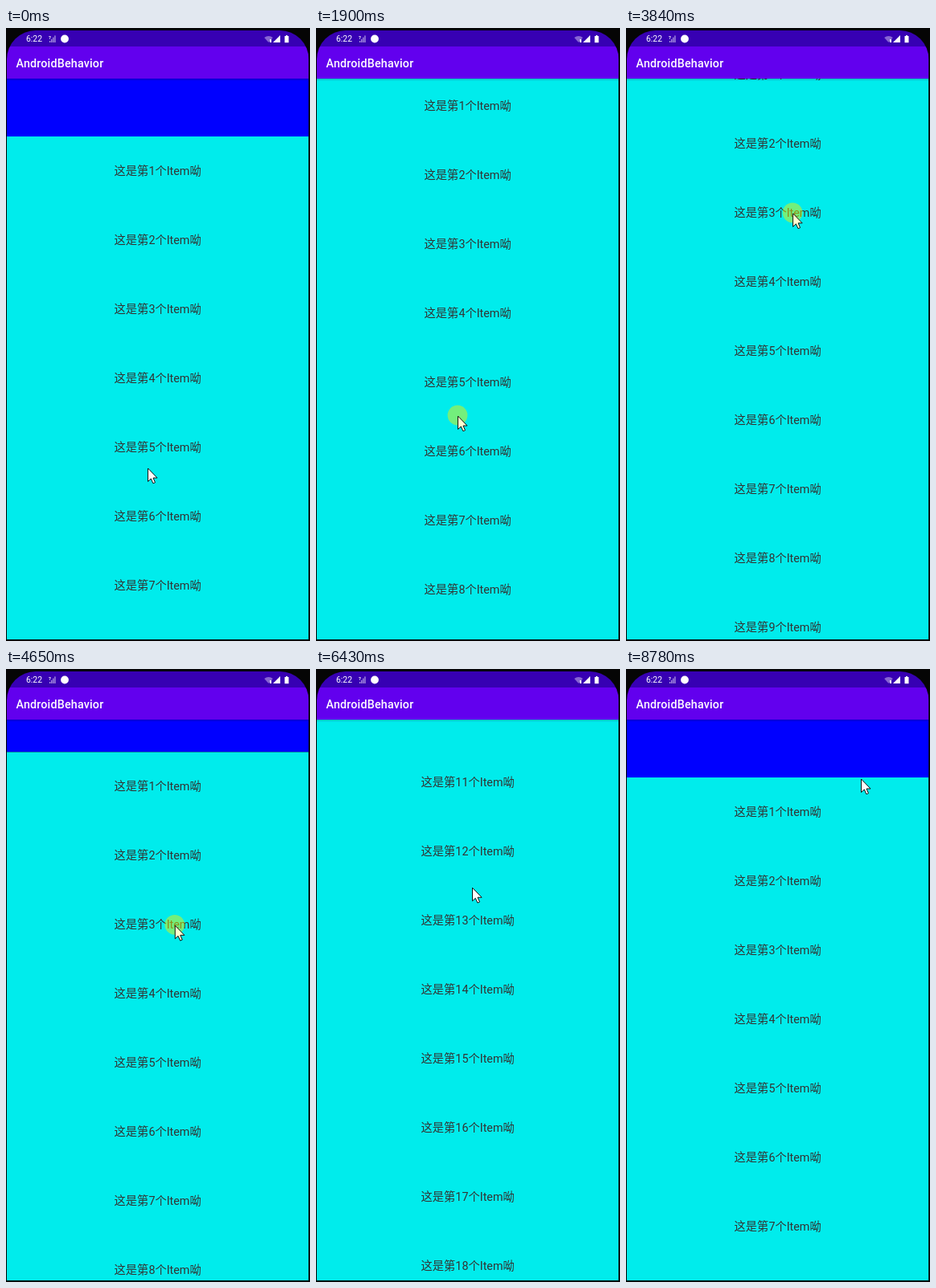
These frames come from a looping animation (378 px wide and 763 px high, 8.85 s). An HTML page with a canvas:

```html
<!DOCTYPE html>
<html lang="zh-CN">
<head>
<meta charset="utf-8">
<title>AndroidBehavior</title>
<style>
html, body { margin: 0; width: 100%; height: 100%; overflow: hidden; background: #050505; }
canvas { display: block; width: 378px; height: 763px; }
</style>
</head>
<body>
<canvas id="stage"></canvas>
<script>
const W = 378, H = 763, LOOP = 8850;
const LEFT = 1, RIGHT = 376.5, TOP = 3, BAR = 23, LIST = 63, BOTTOM = 761;
const HEADER = 72, ROW = 86, ROWS = 20;
const DRAG = 149;                                  // length of the slow drags
const END = HEADER + ROW * ROWS - (BOTTOM - LIST); // scroll at the end of the list
const STEP = 68.57;
const FONT = 'Roboto, "Noto Sans CJK SC", "Noto Sans CJK", sans-serif';

const canvas = document.getElementById('stage');
const ctx = canvas.getContext('2d');
const ratio = window.devicePixelRatio || 1;
canvas.width = W * ratio;
canvas.height = H * ratio;

const clamp = v => Math.max(0, Math.min(1, v));
const ramp = (t, start, end) => clamp((t - start) / (end - start));

function snap(t) {
  const start = [0, 1488, 3496, 4647].filter(s => s <= t).pop();
  return start + Math.floor((t - start) / STEP) * STEP;
}

// Slow drag up and down, then a fling to the end and back
function scrollAt(t) {
  return DRAG * (ramp(t, 1220, 2470) - ramp(t, 3575, 4938)) +
    END * (ramp(t, 6280, 6462.8) - ramp(t, 7225, 7414.4));
}

// Pointer moves; each one leads on from the last
const moves = [
  { from: 560, to: 900, x: 176, y: 572 },
  { from: 1153, to: 2470, x: 176, y: 415 },
  { from: 2860, to: 3310, x: 206, y: 194 },
  { from: 3502, to: 5640, x: 213, y: 428 },
  { from: 5640, to: 6150, x: 198, y: 583 },
  { from: 6220, to: 6430, x: 194, y: 272 },
  { from: 6430, to: 7184, x: 185, y: 310 },
  { from: 7184, to: 7390, x: 180, y: 599 },
  { from: 7390, to: 7600, x: 182, y: 608 },
  { from: 8080, to: 8500, x: 313, y: 100 },
  { from: 8500, to: 8755, x: 292, y: 137 }
];

function pointerAt(t) {
  return moves.reduce((p, m) => {
    const k = ramp(t, m.from, m.to);
    return { x: p.x + (m.x - p.x) * k, y: p.y + (m.y - p.y) * k };
  }, { x: 176, y: 548 });
}

const touches = [[1000, 2860], [3310, 5640], [6200, 6400], [7170, 7380]];

function rect(color, x, y, w, h) {
  ctx.fillStyle = color;
  ctx.fillRect(x, y, w, h);
}

function shape(points, fill) {
  ctx.beginPath();
  points.forEach(([x, y]) => ctx.lineTo(x, y));
  ctx.closePath();
  ctx.fillStyle = fill;
  ctx.fill();
}

function disc(x, y, r, fill) {
  ctx.beginPath();
  ctx.arc(x, y, r, 0, 7);
  ctx.fillStyle = fill;
  ctx.fill();
}

function text(str, x, y, font, color, align, spacing = 0) {
  ctx.font = font + ' ' + FONT;
  ctx.letterSpacing = spacing + 'px';
  ctx.textAlign = align;
  ctx.fillStyle = color;
  ctx.fillText(str, x, y);
}

function drawBars() {
  rect('#3700b3', LEFT, TOP, RIGHT - LEFT, BAR - TOP);
  text('6:22', 25, 17, '10.4px', '#fff', 'left');
  for (let i = 0; i < 4; i++) {
    rect('rgba(255,255,255,.6)', 54 + i * 2.1, 16 - i * 2.2, 1.3, 2 + i * 2.2);
  }
  text('?', 53, 14, '700 6px', '#fff', 'left');
  disc(73, 13.5, 4.9, '#fff');

  ctx.beginPath();
  ctx.moveTo(326.5, 18);
  ctx.arc(326.5, 18, 8, -Math.PI * 0.73, -Math.PI * 0.27);
  ctx.fillStyle = 'rgba(255,255,255,.4)';
  ctx.fill();
  rect('#fff', 328, 14, 2, 4);
  shape([[332, 18], [341, 18], [341, 9]], '#fff');
  rect('#fff', 346.5, 10, 5, 8.2);
  rect('#fff', 348, 9, 2, 1.5);

  rect('#6200ee', LEFT, BAR, RIGHT - LEFT, LIST - BAR);
  text('AndroidBehavior', 12.6, 49, '500 14.3px', '#fff', 'left', 0.18);
}

function drawShadow() {
  const fade = ctx.createLinearGradient(0, LIST, 0, LIST + 3);
  fade.addColorStop(0, 'rgba(0,0,0,.2)');
  fade.addColorStop(1, 'rgba(0,0,0,0)');
  rect(fade, LEFT, LIST, RIGHT - LEFT, 3);
}

// Overscroll glow: a flat arc pulled out of the list edge
function drawGlow(y, dir, amount) {
  if (amount <= 0) return;
  const r = (RIGHT - LEFT) * 1.5, depth = r * (1 - Math.cos(Math.PI / 6));
  ctx.save();
  ctx.translate((LEFT + RIGHT) / 2, y);
  ctx.scale(1, dir * Math.sqrt(amount));
  ctx.beginPath();
  ctx.rect(-W / 2, 0, W, depth);
  ctx.clip();
  disc(0, depth - r, r, `rgba(98,0,238,${0.13 * amount})`);
  ctx.restore();
}

// Rises until peak, then recedes with a decelerating curve
function pulse(t, start, peak, end) {
  return t < peak ? ramp(t, start, peak) : (1 - ramp(t, peak, end)) ** 2;
}

function drawList(t) {
  const scroll = scrollAt(t);
  const top = LIST + Math.max(0, HEADER - scroll);
  rect('#00f', LEFT, LIST, RIGHT - LEFT, top - LIST);

  ctx.save();
  ctx.beginPath();
  ctx.rect(LEFT, top, RIGHT - LEFT, BOTTOM - top);
  ctx.clip();
  rect('#00ecec', LEFT, top, RIGHT - LEFT, BOTTOM - top);
  for (let i = 0; i < ROWS; i++) {
    const y = Math.round(LIST + HEADER + ROW * (i + 0.5) + 5 - scroll);
    text(`这是第${i + 1}个Item呦`, 188.6, y, '14.3px', '#333', 'center');
  }
  drawGlow(top, 1, pulse(t, 4938, 5640, 6220));
  drawGlow(BOTTOM, -1, pulse(t, 6460, 6490, 7120));
  drawGlow(top, 1, pulse(t, 7415, 7455, 7880));
  ctx.restore();
}

function drawPointer(t) {
  const { x, y } = pointerAt(t);
  const pressed = touches.some(([a, b]) => t >= a && t < b);
  if (pressed) disc(x, y - 1, 12.4, 'rgba(240,240,0,.48)');
  ctx.save();
  ctx.translate(x + 0.5, y);
  shape([[0, 0], [0, 16.5], [3.8, 13], [6.4, 18.8], [9, 17.7], [6.5, 12], [11.6, 12]],
    pressed ? '#ffffd0' : '#fff');
  ctx.lineWidth = 1;
  ctx.lineJoin = 'round';
  ctx.strokeStyle = '#111';
  ctx.stroke();
  ctx.restore();
}

function draw(time) {
  const t = snap(time % LOOP);
  ctx.setTransform(ratio, 0, 0, ratio, 0, 0);
  rect('#050505', 0, 0, W, H);
  ctx.save();
  ctx.beginPath();
  ctx.roundRect(LEFT, TOP, RIGHT - LEFT, BOTTOM - TOP, [36, 36, 0, 0]);
  ctx.clip();
  drawBars();
  drawList(t);
  drawShadow();
  drawPointer(t);
  ctx.restore();
}

const begin = performance.now();
function tick() {
  draw(performance.now() - begin);
  requestAnimationFrame(tick);
}
tick();
</script>
</body>
</html>
```
